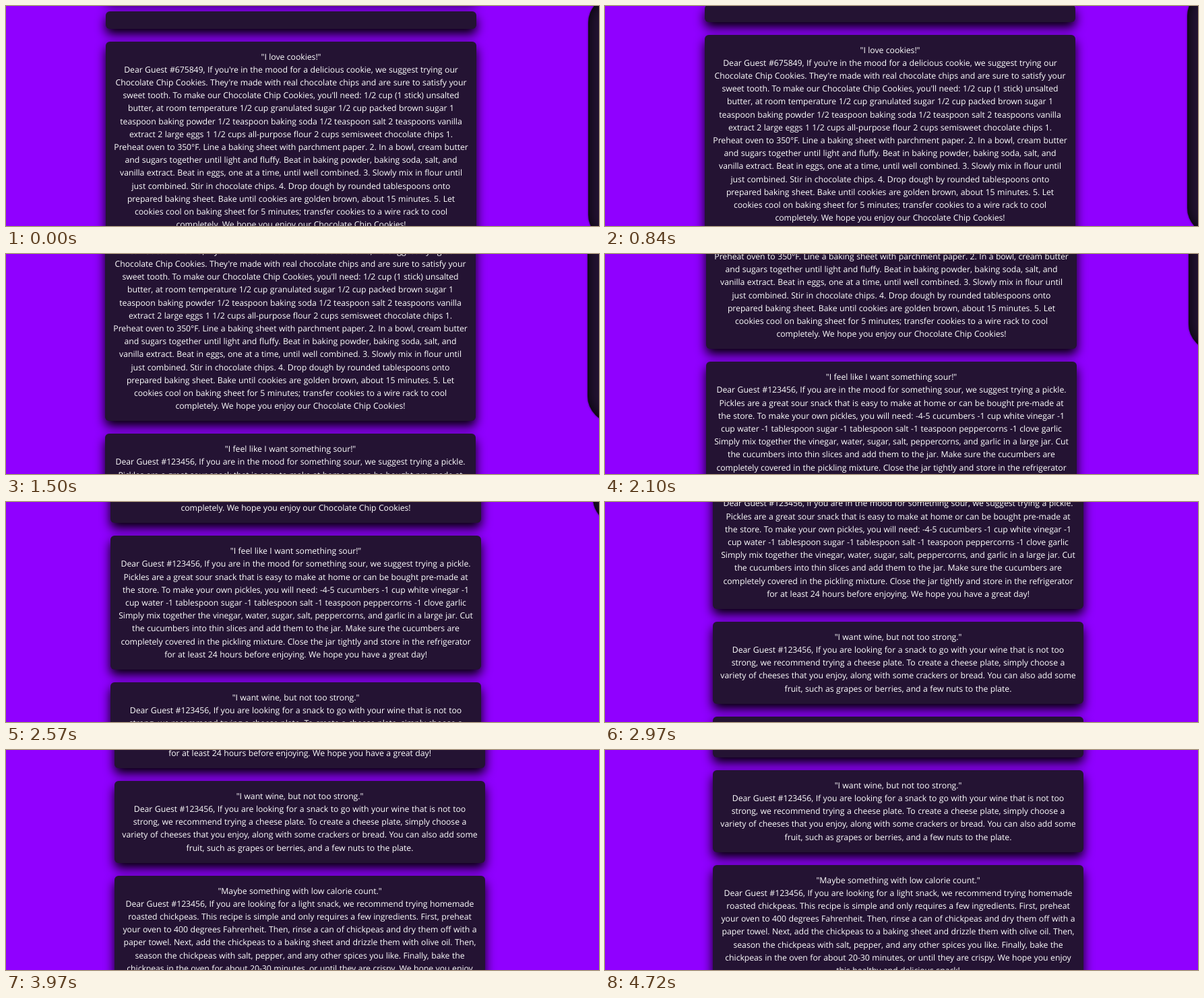
An HTML page that plays this animation: 880 by 327 pixels, repeating every 5.51 s.

```html
<!DOCTYPE html>
<html lang="en">
<head>
<meta charset="utf-8">
<title>Snack suggestions</title>
<style>
  html, body { margin: 0; width: 100%; height: 100%; overflow: hidden; background: #9000ff; }
  #stage { position: relative; width: 880px; height: 327px; overflow: hidden; background: #9000ff; }
  #page { position: absolute; left: 0; top: 0; }
  .card {
    position: absolute; left: 0; width: 550px; padding: 12.8px 0; box-sizing: border-box;
    border-radius: 6px; background: #241333; box-shadow: 0 8px 16px #000;
    color: #fff; text-align: center; white-space: nowrap;
    font: 12.3px/19.2px "Open Sans", "Noto Sans", sans-serif;
    letter-spacing: -.07px; word-spacing: .385px; text-rendering: geometricPrecision;
  }
  .panel {
    position: absolute; left: 716px; top: -23px; width: 300px; height: 365px;
    border-radius: 40px; background: #241333;
    box-shadow: inset 0 0 20px #000, 0 0 3px rgba(0, 0, 0, .6);
  }
</style>
</head>
<body>
<div id="stage"><div id="page"><div class="panel"></div></div></div>
<script>
const LOOP = 5510, LINE = 19.2, PAD = 12.8, GAP = 19.2;

const cards = [
  [],
  [],
  ['"I love cookies!"',
   "Dear Guest #675849, If you're in the mood for a delicious cookie, we suggest trying our",
   "Chocolate Chip Cookies. They're made with real chocolate chips and are sure to satisfy your",
   "sweet tooth. To make our Chocolate Chip Cookies, you'll need: 1/2 cup (1 stick) unsalted",
   "butter, at room temperature 1/2 cup granulated sugar 1/2 cup packed brown sugar 1",
   "teaspoon baking powder 1/2 teaspoon baking soda 1/2 teaspoon salt 2 teaspoons vanilla",
   "extract 2 large eggs 1 1/2 cups all-purpose flour 2 cups semisweet chocolate chips 1.",
   "Preheat oven to 350°F. Line a baking sheet with parchment paper. 2. In a bowl, cream butter",
   "and sugars together until light and fluffy. Beat in baking powder, baking soda, salt, and",
   "vanilla extract. Beat in eggs, one at a time, until well combined. 3. Slowly mix in flour until",
   "just combined. Stir in chocolate chips. 4. Drop dough by rounded tablespoons onto",
   "prepared baking sheet. Bake until cookies are golden brown, about 15 minutes. 5. Let",
   "cookies cool on baking sheet for 5 minutes; transfer cookies to a wire rack to cool",
   "completely. We hope you enjoy our Chocolate Chip Cookies!"],
  ['"I feel like I want something sour!"',
   "Dear Guest #123456, If you are in the mood for something sour, we suggest trying a pickle.",
   "Pickles are a great sour snack that is easy to make at home or can be bought pre-made at",
   "the store. To make your own pickles, you will need: -4-5 cucumbers -1 cup white vinegar -1",
   "cup water -1 tablespoon sugar -1 tablespoon salt -1 teaspoon peppercorns -1 clove garlic",
   "Simply mix together the vinegar, water, sugar, salt, peppercorns, and garlic in a large jar. Cut",
   "the cucumbers into thin slices and add them to the jar. Make sure the cucumbers are",
   "completely covered in the pickling mixture. Close the jar tightly and store in the refrigerator",
   "for at least 24 hours before enjoying. We hope you have a great day!"],
  ['"I want wine, but not too strong."',
   "Dear Guest #123456, If you are looking for a snack to go with your wine that is not too",
   "strong, we recommend trying a cheese plate. To create a cheese plate, simply choose a",
   "variety of cheeses that you enjoy, along with some crackers or bread. You can also add some",
   "fruit, such as grapes or berries, and a few nuts to the plate."],
  ['"Maybe something with low calorie count."',
   "Dear Guest #123456, If you are looking for a light snack, we recommend trying homemade",
   "roasted chickpeas. This recipe is simple and only requires a few ingredients. First, preheat",
   "your oven to 400 degrees Fahrenheit. Then, rinse a can of chickpeas and dry them off with a",
   "paper towel. Next, add the chickpeas to a baking sheet and drizzle them with olive oil. Then,",
   "season the chickpeas with salt, pepper, and any other spices you like. Finally, bake the",
   "chickpeas in the oven for about 20-30 minutes, or until they are crispy. We hope you enjoy",
   "this healthy and delicious snack!"]
];

const page = document.getElementById("page");
let cardTop = -(2 * PAD + GAP);
for (const lines of cards) {
  const card = document.createElement("div");
  const height = lines.length * LINE + 2 * PAD;
  card.className = "card";
  card.style.top = cardTop + "px";
  card.style.height = height + "px";
  for (const line of lines) {
    const row = document.createElement("div");
    row.textContent = line;
    card.append(row);
  }
  page.append(card);
  cardTop += height + GAP;
}

// Camera path: time, x, y
const path = [
  [770, 148, 8], [840, 148, -2], [1500, 147, -92], [2100, 150, -199],
  [2970, 160, -398], [3590, 163, -492], [4180, 160, -546]
];

// Runs of evenly spaced camera steps: first, last, count
const runs = [
  [840, 1360, 9], [1430, 1960, 9], [2030, 2570, 9],
  [2640, 3170, 9], [3240, 3790, 9], [3840, 4180, 6]
];

function snap(t) {
  let at = 770;
  for (const [first, last, count] of runs) {
    if (t < first) break;
    const step = (last - first) / (count - 1);
    at = first + step * Math.min(count - 1, Math.floor((t - first + 4) / step));
  }
  return at;
}

function slope(i, k) {
  if (i === path.length - 1) return 0;
  const a = path[Math.max(0, i - 1)], b = path[i + 1];
  return (b[k] - a[k]) / (b[0] - a[0]);
}

// Cubic Hermite curve through the path
function along(t, k) {
  let i = 0;
  while (i < path.length - 2 && t >= path[i + 1][0]) i++;
  const a = path[i], b = path[i + 1], d = b[0] - a[0];
  const u = Math.min(1, Math.max(0, (t - a[0]) / d)), v = 1 - u;
  return a[k] * v * v * (1 + 2 * u) + b[k] * u * u * (3 - 2 * u)
    + d * u * v * (slope(i, k) * v - slope(i + 1, k) * u);
}

const start = performance.now();
function draw() {
  const t = snap((performance.now() - start) % LOOP);
  page.style.transform = `translate(${Math.round(along(t, 1))}px, ${Math.round(along(t, 2))}px)`;
  requestAnimationFrame(draw);
}
draw();
</script>
</body>
</html>
```
